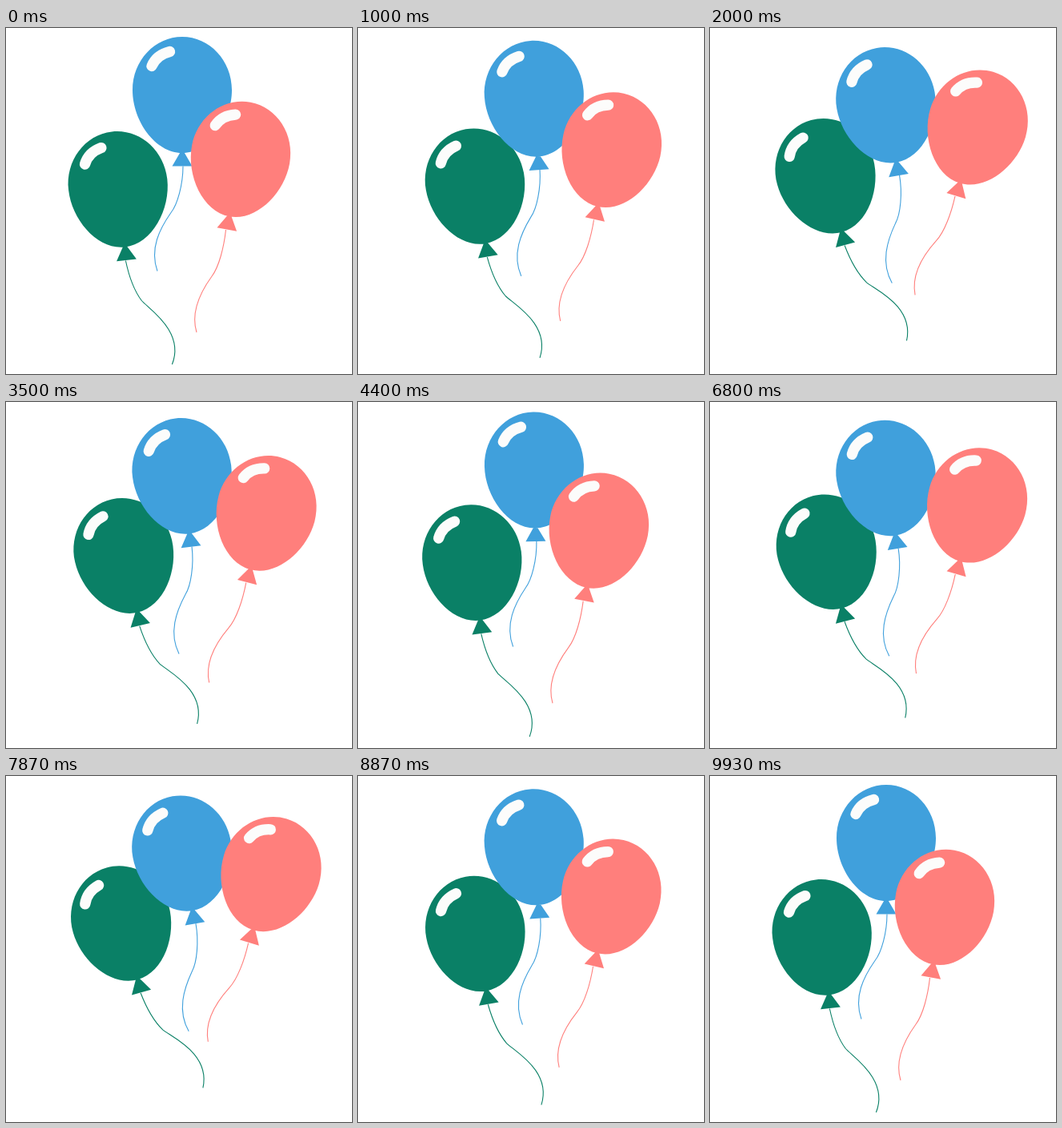
Recreate the animation shown at these times as an HTML page. Size 432 px wide and 432 px high, loop 9.96 s.

```html
<!DOCTYPE html>
<html lang="en">
<head>
<meta charset="utf-8">
<title>Balloons</title>
<style>
  html, body { margin: 0; width: 100%; height: 100%; overflow: hidden; background: #fff; }
  svg { display: block; width: 100vw; height: 100vh; }
</style>
</head>
<body>
<svg id="stage" viewBox="0 0 432 432">
  <defs>
    <g id="body">
      <path d="M-62-6C-62-43-34-72.5 0-72.5S62-43 62-6C62 32 34 72.5 0 72.5S-62 32-62-6ZM0 67.5L12.5 89H-12.5Z"/>
      <path d="M-38-36Q-32-50-15.5-54" fill="none" stroke="#fcfcfb" stroke-width="13.3" stroke-linecap="round"/>
    </g>
  </defs>
</svg>
<script>
const LOOP = 9960, FPS = 15, SWAY_STEPS = 74;

// Each motion triple weighs [lift, lift², lift on the way out minus the way back].
const balloons = [
  { color: '#0a8066', x: 140.4, y: 201.5, tilt: -6.5,
    string: 'M9 89C13 108 20 127 29 139C39 150 83 178 67 218.5',
    dx: [27, -23.5, 0], dy: [-6, -13.2, 0], turn: [-9.75, 0, 0] },
  { color: '#40a0dc', x: 220, y: 83.5, tilt: 0,
    string: 'M1 89C1 112-6 137-14 147C-28 167-41 192-31 220',
    dx: [0.5, 0, 0], dy: [13, 1.2, 0], turn: [-10.7, 0, 0] },
  { color: '#ff7f7c', x: 292, y: 164, tilt: 10.5,
    string: 'M-17.5 88C-20 110-26 134-35 146C-48 164-62 190-54 216',
    dx: [76.5, -37, 3.5], dy: [-26.5, -18.5, 0], turn: [6.7, 0, 0] }
];

const stage = document.getElementById('stage');

for (const b of balloons) {
  b.node = document.createElementNS('http://www.w3.org/2000/svg', 'g');
  b.node.innerHTML =
    `<path d="${b.string}" fill="none" stroke="${b.color}" stroke-width="1.1"/>
     <use href="#body" fill="${b.color}" transform="rotate(${b.tilt})"/>`;
  stage.append(b.node);
}

function draw(now) {
  const step = Math.floor((now % LOOP) / 1000 * FPS + 0.1) % (SWAY_STEPS + 1);
  const phase = 2 * Math.PI * step / SWAY_STEPS;
  const lift = (1 - Math.cos(phase)) / 2;
  const mix = ([a, b, c]) => lift * (a + b * lift + c * Math.sin(phase));

  for (const b of balloons) {
    b.node.setAttribute('transform',
      `translate(${b.x + mix(b.dx)} ${b.y + mix(b.dy)}) rotate(${mix(b.turn)})`);
  }
}

const start = performance.now();
function tick() {
  draw(performance.now() - start);
  requestAnimationFrame(tick);
}
tick();
</script>
</body>
</html>
```
